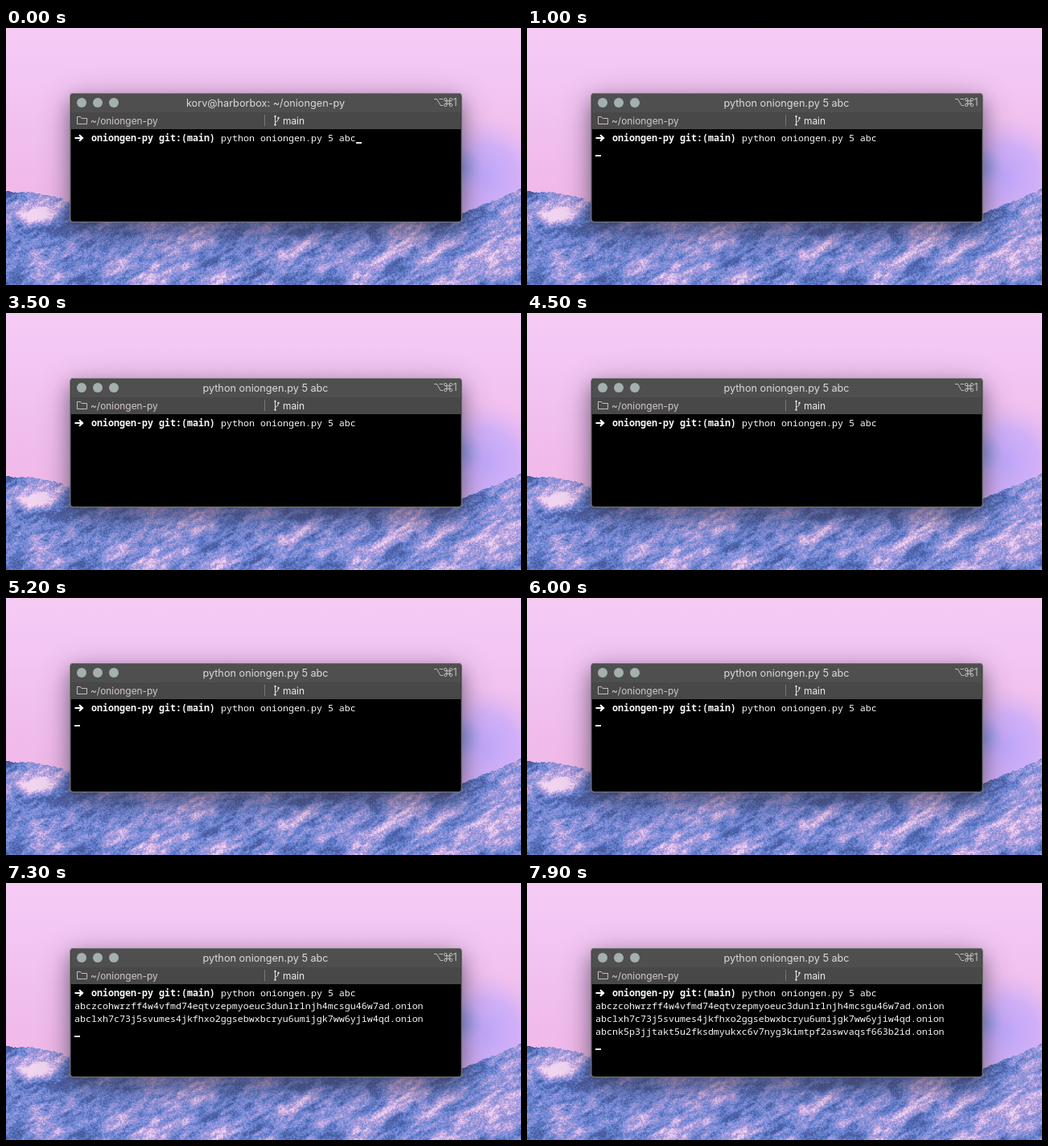
Animation, 640 px wide and 320 px high, one loop 8000 ms. Source, as an HTML page with a canvas:

```html
<!DOCTYPE html>
<html lang="en">
<head>
<meta charset="utf-8">
<title>Terminal</title>
<style>
html, body { margin: 0; width: 100%; height: 100%; overflow: hidden; background: #efbdf0; }
canvas { display: block; width: 640px; height: 320px; }
</style>
</head>
<body>
<canvas id="stage" width="640" height="320"></canvas>
<script>
const W = 640, H = 320, LOOP = 8000;
const UI = 'Inter, "Liberation Sans", sans-serif';
const MONO = '"Noto Sans Mono", "DejaVu Sans Mono", monospace';
const COL = 7, ROW = 16.1, LEFT = 85, TOP = 137;
const ENTER = 900;
const COMMAND = 'python oniongen.py 5 abc';
const OUTPUT = [
  [6500, 'abczcohwrzff4w4vfmd74eqtvzepmyoeuc3dunlrlnjh4mcsgu46w7ad.onion'],
  [7200, 'abclxh7c73j5svumes4jkfhxo2ggsebwxbcryu6umijgk7ww6yjiw4qd.onion'],
  [7700, 'abcnk5p3jjtakt5u2fksdmyukxc6v7nyg3kimtpf2aswvaqsf663b2id.onion']
];
const RIDGE = [[0, 202], [14, 204], [30, 203], [48, 207], [80, 215], [130, 221], [220, 232],
  [420, 240], [540, 236], [566, 231], [590, 220], [608, 214], [626, 206], [641, 199]];

const ctx = document.getElementById('stage').getContext('2d');
const mix = (a, b, k) => a + (b - a) * k;
const clamp = k => Math.max(0, Math.min(1, k));

function hash(x, y) {
  let n = Math.imul(x, 374761393) ^ Math.imul(y, 668265263);
  n = Math.imul(n ^ (n >>> 13), 1274126177);
  return ((n ^ (n >>> 16)) >>> 0) / 4294967296;
}

function noise(x, y) {
  const i = Math.floor(x), j = Math.floor(y);
  const fx = x - i, fy = y - j;
  const u = fx * fx * (3 - 2 * fx), v = fy * fy * (3 - 2 * fy);
  return mix(mix(hash(i, j), hash(i + 1, j), u), mix(hash(i, j + 1), hash(i + 1, j + 1), u), v);
}

function ridgeY(x) {
  const n = RIDGE.findIndex(p => p[0] > x);
  const [x0, y0] = RIDGE[n - 1], [x1, y1] = RIDGE[n];
  return mix(y0, y1, (x - x0) / (x1 - x0)) + noise(x / 4, 3) * 2 - 1;
}

function ramp(stops, k) {
  const s = clamp(k) * (stops.length - 1), i = Math.min(stops.length - 2, Math.floor(s));
  return stops[i].map((c, n) => mix(c, stops[i + 1][n], s - i));
}

function fillGradient(g, gradient, stops) {
  stops.forEach(([at, color]) => gradient.addColorStop(at, color));
  g.fillStyle = gradient;
  g.fillRect(0, 0, W, H);
}

function paintSky(g) {
  fillGradient(g, g.createLinearGradient(0, 0, 0, 220),
    [[0, '#f5cbf4'], [0.3, '#f3c6f3'], [0.6, '#f1bfee'], [1, '#f0b8e8']]);
  fillGradient(g, g.createRadialGradient(595, 185, 5, 595, 185, 75),
    [[0, 'rgba(190,166,250,.95)'], [0.5, 'rgba(200,172,250,.8)'], [1, 'rgba(220,182,246,0)']]);
  fillGradient(g, g.createRadialGradient(566, 174, 2, 566, 174, 26),
    [[0, 'rgba(140,155,235,.8)'], [1, 'rgba(150,160,240,0)']]);
}

function paintHills(g) {
  const img = g.getImageData(0, 0, W, H), px = img.data;
  const tones = [[74, 90, 156], [88, 116, 194], [118, 140, 216], [160, 152, 218], [208, 178, 230], [240, 212, 240]];
  for (let x = 0; x < W; x++) {
    const top = ridgeY(x);
    for (let y = Math.ceil(top); y < H; y++) {
      const along = x * 0.86 - y * 0.5, across = x * 0.5 + y * 0.86;
      let k = 0.42 * noise(along / 38, across / 13) + 0.3 * noise(along / 11 + 50, across / 4)
        + 0.28 * noise(x / 1.4 + 90, y / 1.2);
      k = 0.46 + (k - 0.5) * 1.7;
      k -= 0.08 * clamp(1 - (y - top) / 10);
      const snow = 1 - Math.hypot((x - 42) / 32, (y - 234) / 14);
      k += 0.9 * clamp(snow);
      ramp(tones, k).forEach((c, n) => px[(y * W + x) * 4 + n] = c);
    }
  }
  g.putImageData(img, 0, 0);
}

function paintFolder(g) {
  g.beginPath();
  g.moveTo(88.5, 119.5);
  g.lineTo(88.5, 110.5);
  g.lineTo(92.5, 110.5);
  g.lineTo(94, 112.5);
  g.lineTo(100.5, 112.5);
  g.lineTo(100.5, 119.5);
  g.closePath();
  g.stroke();
}

function paintBranch(g) {
  g.beginPath();
  g.moveTo(334.5, 110);
  g.lineTo(334.5, 121);
  g.moveTo(334.5, 117.5);
  g.quadraticCurveTo(338.5, 116, 338.5, 112.5);
  g.stroke();
  [[334.5, 110], [338.5, 112], [334.5, 120.5]].forEach(([x, y]) => {
    g.beginPath();
    g.arc(x, y, 1.2, 0, 7);
    g.fill();
  });
}

function paintShortcut(g) {
  g.beginPath();
  g.moveTo(532, 88.5);
  g.lineTo(535.5, 88.5);
  g.lineTo(540, 96.5);
  g.lineTo(543, 96.5);
  g.moveTo(538.5, 88.5);
  g.lineTo(543, 88.5);
  g.stroke();
  g.beginPath();
  for (const sx of [-1, 1]) for (const sy of [-1, 1]) {
    g.moveTo(549.5 + sx * 3.4 + 1.7, 92.5 + sy * 3.4);
    g.arc(549.5 + sx * 3.4, 92.5 + sy * 3.4, 1.7, 0, Math.PI * 2);
  }
  for (const s of [-1.7, 1.7]) {
    g.moveTo(549.5 + s, 89.1);
    g.lineTo(549.5 + s, 95.9);
    g.moveTo(546.1, 92.5 + s);
    g.lineTo(552.9, 92.5 + s);
  }
  g.stroke();
  label(g, '1', 555.5, 92.5, '12.7px ' + UI, '#bcbcbc');
}

function label(g, text, x, y, font, color, align = 'left') {
  g.font = font;
  g.fillStyle = color;
  g.textAlign = align;
  g.textBaseline = 'alphabetic';
  g.fillText(text, x, y + 4.5);
}

function paintShadow(g, color, blur, drop) {
  g.save();
  g.shadowColor = color;
  g.shadowBlur = blur;
  g.shadowOffsetY = drop;
  g.fillStyle = '#777';
  g.beginPath();
  g.roundRect(79.5, 81, 487, 161, 4);
  g.fill();
  g.restore();
}

function paintWindow(g) {
  paintShadow(g, 'rgba(60,40,75,.42)', 40, 9);
  paintShadow(g, 'rgba(55,60,75,.45)', 22, 10);
  g.save();
  g.beginPath();
  g.roundRect(80.5, 82, 485, 159, 3.5);
  g.clip();
  g.fillStyle = '#000';
  g.fillRect(80, 81, 487, 161);
  g.fillStyle = '#4f4f4f';
  g.fillRect(80, 81, 487, 24);
  g.fillStyle = '#484848';
  g.fillRect(80, 105, 487, 21);
  g.restore();

  g.fillStyle = '#a4afb0';
  for (const x of [94, 114, 134]) {
    g.beginPath();
    g.arc(x, 93, 6, 0, 7);
    g.fill();
  }
  g.lineWidth = 1;
  g.strokeStyle = '#bcbcbc';
  paintShortcut(g);
  g.strokeStyle = '#c8bcc2';
  paintFolder(g);
  g.fillStyle = g.strokeStyle = '#e4e4e4';
  paintBranch(g);
  g.fillStyle = '#777';
  g.fillRect(321, 108, 1, 14);
  label(g, '~/oniongen-py', 105, 115, '11.9px ' + UI, '#d0c6ca');
  label(g, 'main', 344, 115, '11.9px ' + UI, '#ececec');
}

function paintPrompt(g) {
  g.strokeStyle = '#fff';
  g.lineWidth = 2.2;
  g.beginPath();
  g.moveTo(85.5, 137);
  g.lineTo(94, 137);
  g.moveTo(91, 133.2);
  g.lineTo(95, 137);
  g.lineTo(91, 140.8);
  g.stroke();
  mono(g, 'oniongen-py git:(main)', 3, 0, 'bold');
  mono(g, COMMAND, 26, 0);
}

function mono(g, text, col, row, weight = '500') {
  label(g, text, LEFT + col * COL, TOP + row * ROW - 0.5, weight + ' 11.667px ' + MONO, '#f6f8fa');
}

function makeScene() {
  const layer = document.createElement('canvas');
  layer.width = W;
  layer.height = H;
  const g = layer.getContext('2d');
  paintSky(g);
  paintHills(g);
  paintWindow(g);
  paintPrompt(g);
  return layer;
}

const scene = makeScene();

function draw(t) {
  ctx.drawImage(scene, 0, 0);
  const running = t >= ENTER;
  const lines = OUTPUT.filter(([at]) => t >= at);
  const title = running ? COMMAND : 'korv@harborbox: ~/oniongen-py';
  label(ctx, title, 322.5, 93, '12.7px ' + UI, '#dadada', 'center');
  lines.forEach(([, text], i) => mono(ctx, text, 0, i + 1));

  // Fresh activity keeps the blinking cursor visible.
  const fresh = [ENTER, ...OUTPUT.map(o => o[0])].some(at => t >= at && t < at + 500);
  if (fresh || t % 1000 < 500) {
    const col = running ? 0 : 26 + COMMAND.length;
    const row = running ? lines.length + 1 : 0;
    ctx.fillStyle = '#e6e6e6';
    ctx.fillRect(LEFT + col * COL, Math.round(TOP + row * ROW) + 5, 7, 2);
  }
}

function tick(now) {
  draw(now % LOOP);
  requestAnimationFrame(tick);
}
draw(0);
requestAnimationFrame(tick);
</script>
</body>
</html>
```
